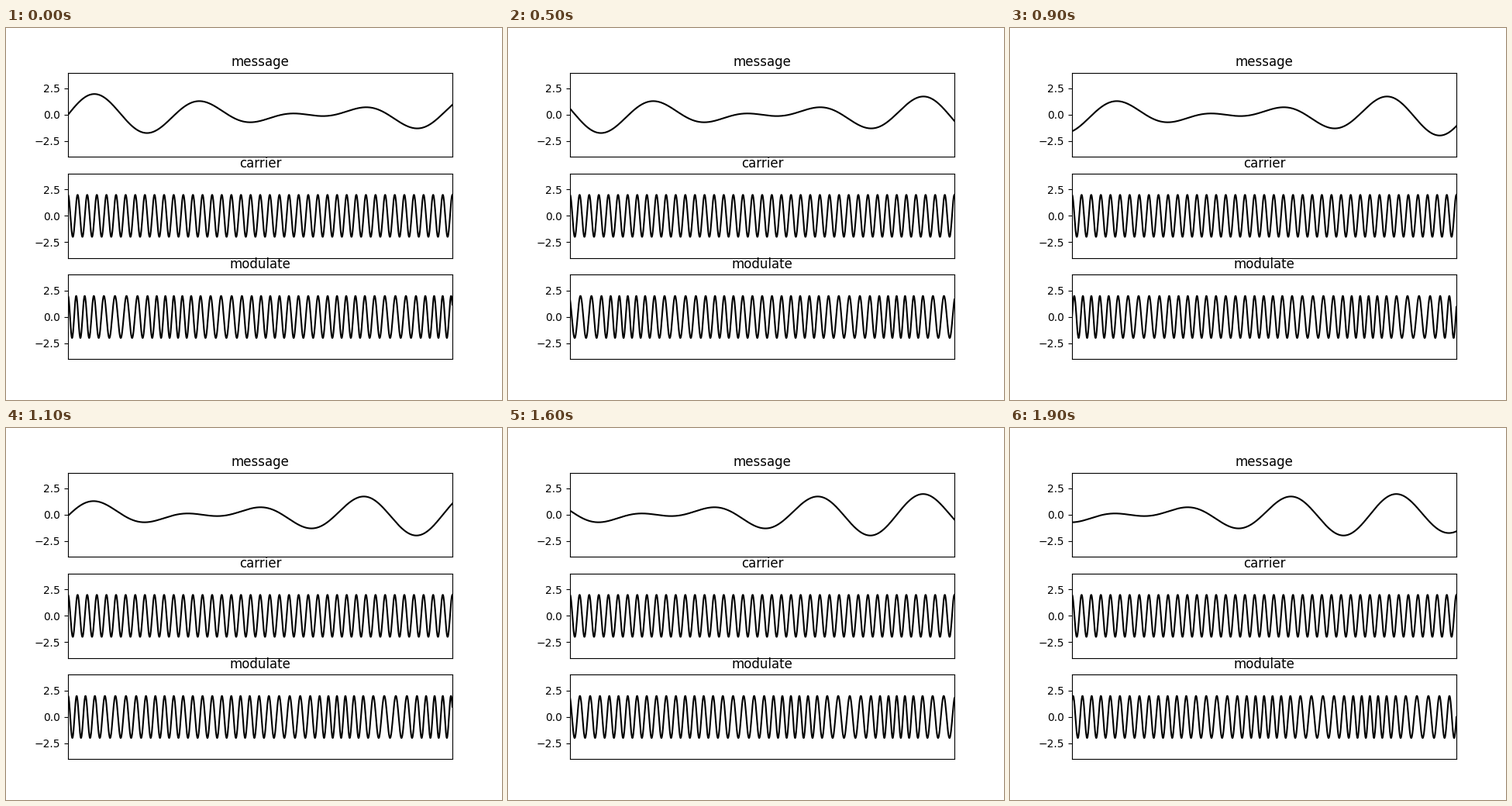
Animation of 640x480 px, one loop 2 s. Source, as a matplotlib script:

```python
import numpy as np
import matplotlib.pyplot as plt
from matplotlib.animation import FuncAnimation

FRAMES = 20
INTERVAL = 100   # ms
SPAN = 0.8       # seconds of signal across each panel
CARRIER = 50     # Hz
STEP = 0.02      # seconds of signal scrolled per frame
AMP = 2

t = np.linspace(0, SPAN, 1601)


def message(t):
    return np.sin(2 * np.pi * 4 * t) + np.sin(2 * np.pi * 5 * t)


def carrier(t, phase=0):
    return AMP * np.cos(2 * np.pi * CARRIER * t + phase)


def panel(ax, title, y):
    ax.set_title(title)
    ax.set_xlim(0, SPAN)
    ax.set_ylim(-4, 4)
    ax.set_xticks([])
    ax.set_yticks([-2.5, 0, 2.5])
    return ax.plot(t, y, color="black", lw=1.5)[0]


fig, axes = plt.subplots(3, 1, figsize=(6.4, 4.8), dpi=100)
msg_line = panel(axes[0], "message", message(t))
panel(axes[1], "carrier", carrier(t))
mod_line = panel(axes[2], "modulate", carrier(t, message(t)))


def update(i):
    m = message(t + i * STEP)
    msg_line.set_ydata(m)
    mod_line.set_ydata(carrier(t, m))
    return msg_line, mod_line


anim = FuncAnimation(fig, update, frames=FRAMES, interval=INTERVAL,
                     init_func=lambda: update(0), repeat=True, repeat_delay=0)
plt.show()
```
